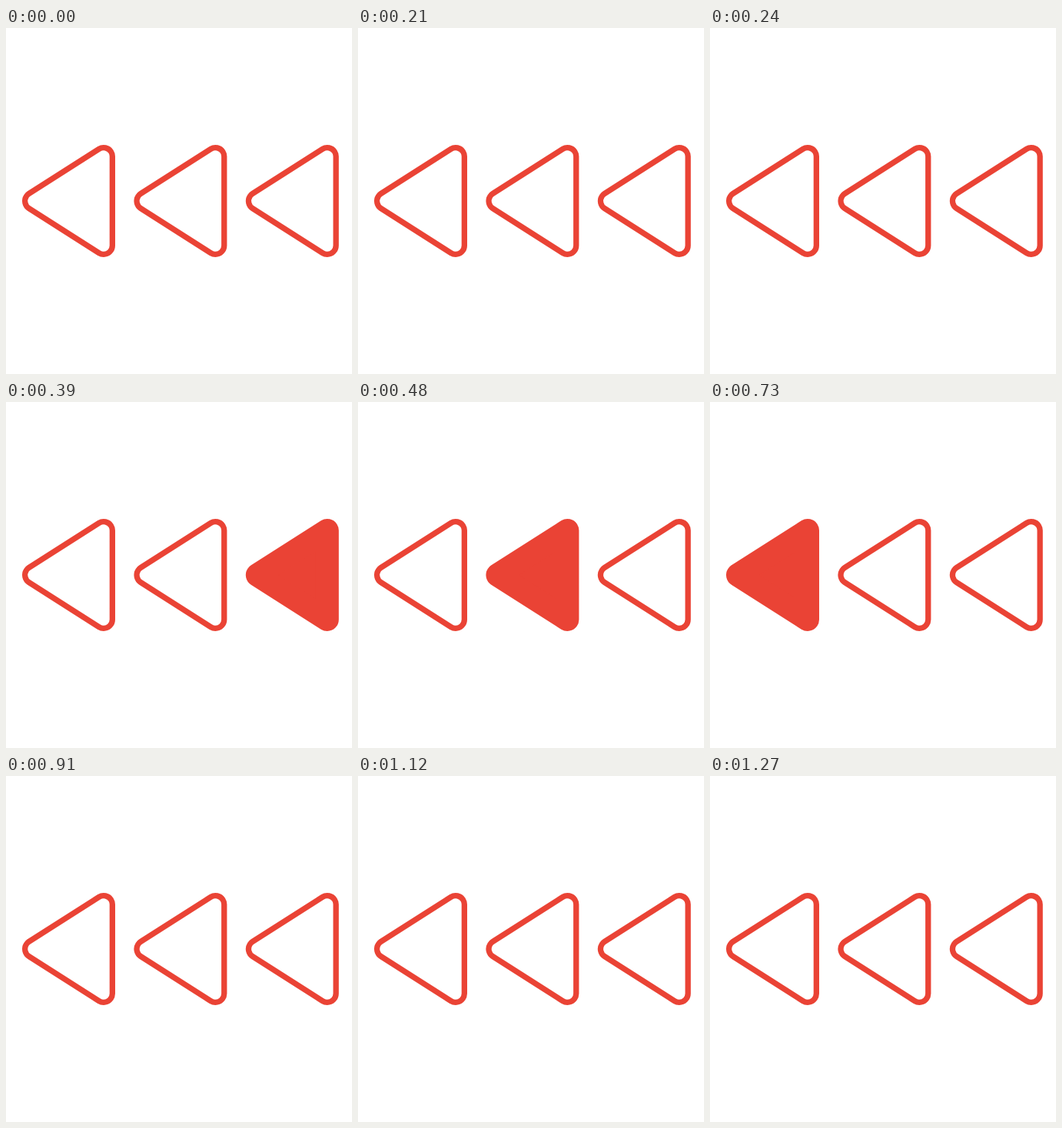
These frames come from a looping animation (450 px wide and 450 px high, 1330 ms). An HTML page:

```html
<!DOCTYPE html>
<html>
<head>
<meta charset="utf-8">
<style>
  html, body { margin: 0; width: 100%; height: 100%; overflow: hidden; background: #fff; }
  svg { display: block; width: 100vw; height: 100vh; }
  .outer { fill: #ea4335; stroke: #ea4335; stroke-width: 30; }
  .inner { fill: #fff; stroke: #fff; stroke-width: 15.4; }
</style>
</head>
<body>
<svg viewBox="0 0 450 450" stroke-linejoin="round">
  <defs><path id="tri" d="M36 225L127 167V283Z"/></defs>
  <g id="arrows"></g>
</svg>
<script>
  const LOOP = 1330, START = 300, HOLD = 170, SPACING = 145.4;
  const arrows = document.getElementById('arrows');
  arrows.innerHTML = [0, 1, 2].map(i =>
    `<g transform="translate(${i * SPACING} 0)">
      <use href="#tri" class="outer"/><use href="#tri" class="inner"/>
    </g>`).join('');
  const holes = [...arrows.querySelectorAll('.inner')];

  // The filled arrow steps from right to left.
  function draw() {
    const t = performance.now() % LOOP;
    const filled = 2 - Math.floor((t - START) / HOLD);
    holes.forEach((hole, i) => hole.setAttribute('visibility', i === filled ? 'hidden' : 'visible'));
    requestAnimationFrame(draw);
  }
  draw();
</script>
</body>
</html>
```
